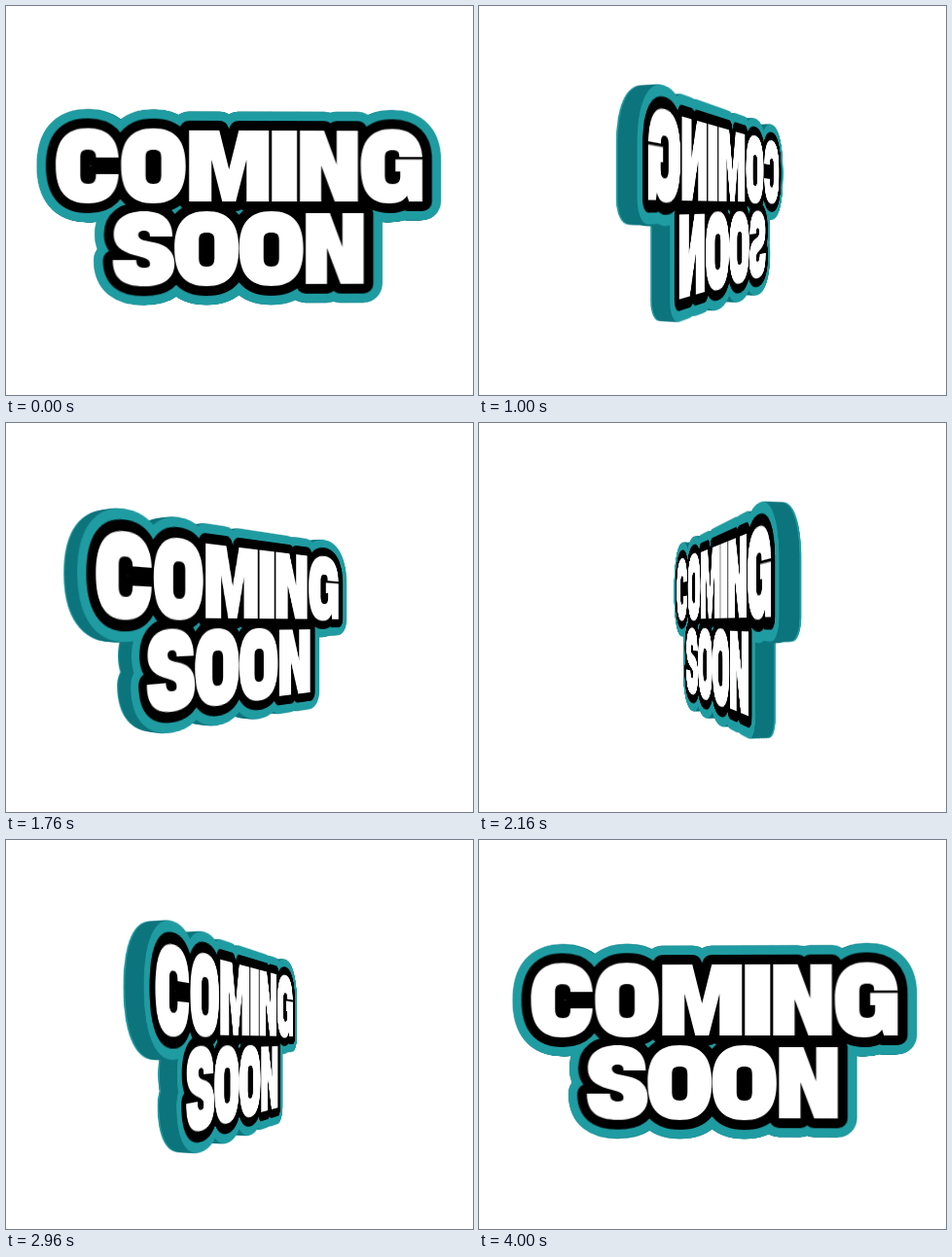
An HTML page for the animation above (4040 ms loop, 480 px wide and 400 px high).

```html
<!DOCTYPE html>
<html lang="en">
<head>
<meta charset="utf-8">
<title>Coming soon</title>
<style>
  html, body { margin: 0; width: 100%; height: 100%; overflow: hidden; background: #fff; }
  #stage {
    position: relative; width: 480px; height: 400px; overflow: hidden;
    perspective: 770px; perspective-origin: 240px 206px;
  }
  #sign {
    position: absolute; inset: 0;
    transform-style: preserve-3d; transform-origin: 240px 206px;
  }
  #sign svg { position: absolute; left: 0; top: 0; overflow: visible; }
</style>
</head>
<body>
<div id="stage"><div id="sign" role="img" aria-label="COMING SOON"></div></div>
<script>
const LOOP = 4040, STEP = 40, DEPTH = 18, LAYERS = 13;
const TEAL = '#1f9ca2', WALL = '#0c747c';

// Block letters, 73 units tall
const GLYPHS = {
  C: 'M64 28C63 9 53-2 33-2C10-2 0 11 0 36.5S10 75 33 75C53 75 63 64 64 45H41C41 52 39 55 33 55S25 52 25 46V28C25 22 27 20 33 20S41 23 41 28Z',
  O: 'M33-2C56-2 66 11 66 36.5S56 75 33 75S0 62 0 36.5S10-2 33-2ZM33 20C27 20 25 22 25 28V46C25 52 27 55 33 55S41 52 41 46V28C41 22 39 20 33 20Z',
  M: 'M0 0H31L41 40L51 0H82V73H59V30L48 73H34L23 30V73H0Z',
  I: 'M0 0H26V73H0Z',
  N: 'M0 0H25L38 35V0H60V73H36L22 36V73H0Z',
  G: 'M64 27C63 9 53-2 33-2C10-2 0 11 0 36.5S9 75 30 75C39 75 45 72 48 67L50 73H64V29.5H36V42H41V47C41 52 39 55 33 55S25 52 25 46V28C25 22 27 20 33 20S40 22 40 27Z',
  S: 'M61 24H38C38 20 36 18 32 18S26 20 26 22C26 27 31 28 42 30C56 33 63 40 63 52C63 67 52 75 32 75C11 75 0 67 0 48H24C24 54 27 56 32 56C36 56 38 55 38 52C38 47 33 46 22 43C8 39 1 33 1 22C1 7 12-2 32-2C51-2 61 7 61 24Z'
};
const ROWS = [
  { word: 'COMING', y: 128, xs: [51, 117.5, 187, 272, 301, 364] },
  { word: 'SOON', y: 213, xs: [109, 172, 238.5, 307] }
];

const letters = ROWS.map(({ word, y, xs }) => [...word].map((ch, i) =>
  `<path transform="translate(${xs[i] + 1.25} ${y})" d="${GLYPHS[ch]}"/>`).join('')).join('');
const outline = (color, width) =>
  `<g fill="${color}" stroke="${color}" stroke-width="${width}" stroke-linejoin="round">${letters}</g>`;
const face = outline(TEAL, 38.5) + outline('#000', 20) +
  `<g fill="#fff" fill-rule="evenodd">${letters}</g>`;
const layer = (art, z) =>
  `<svg width="480" height="400" style="transform:translateZ(${z}px)">${art}</svg>`;

const sign = document.getElementById('sign');
sign.innerHTML = Array.from({ length: LAYERS }, (_, i) => {
  const outer = i === 0 || i === LAYERS - 1;
  return layer(outer ? face : outline(WALL, 38.5), -DEPTH * i / (LAYERS - 1));
}).join('');

// [ms, degrees]: two eased turns, then a rest
const TURN = [[0, -1.5], [640, 44], [1120, 137], [1360, 193], [2160, 436],
              [2640, 577], [3320, 706], [3640, 721.5]];
const slope = i => (TURN[i + 1][1] - TURN[i][1]) / (TURN[i + 1][0] - TURN[i][0]);
const tangents = TURN.map(([t], i) => {
  if (i === 0 || i === TURN.length - 1) return 0;
  const before = t - TURN[i - 1][0], after = TURN[i + 1][0] - t;
  return (slope(i - 1) * after + slope(i) * before) / (before + after);
});

function angleAt(t) {
  const i = TURN.findIndex(([time]) => time > t) - 1;
  if (i < 0) return TURN[TURN.length - 1][1];
  const [t0, a0] = TURN[i], [t1, a1] = TURN[i + 1];
  const span = t1 - t0, u = (t - t0) / span, v = 1 - u;
  return a0 * v * v * (1 + 2 * u) + a1 * u * u * (3 - 2 * u) +
    span * u * v * (tangents[i] * v - tangents[i + 1] * u);
}

function draw() {
  const t = Math.floor((performance.now() % LOOP) / STEP) * STEP;
  sign.style.transform = `rotateY(${-angleAt(t)}deg)`;
  requestAnimationFrame(draw);
}
draw();
</script>
</body>
</html>
```
